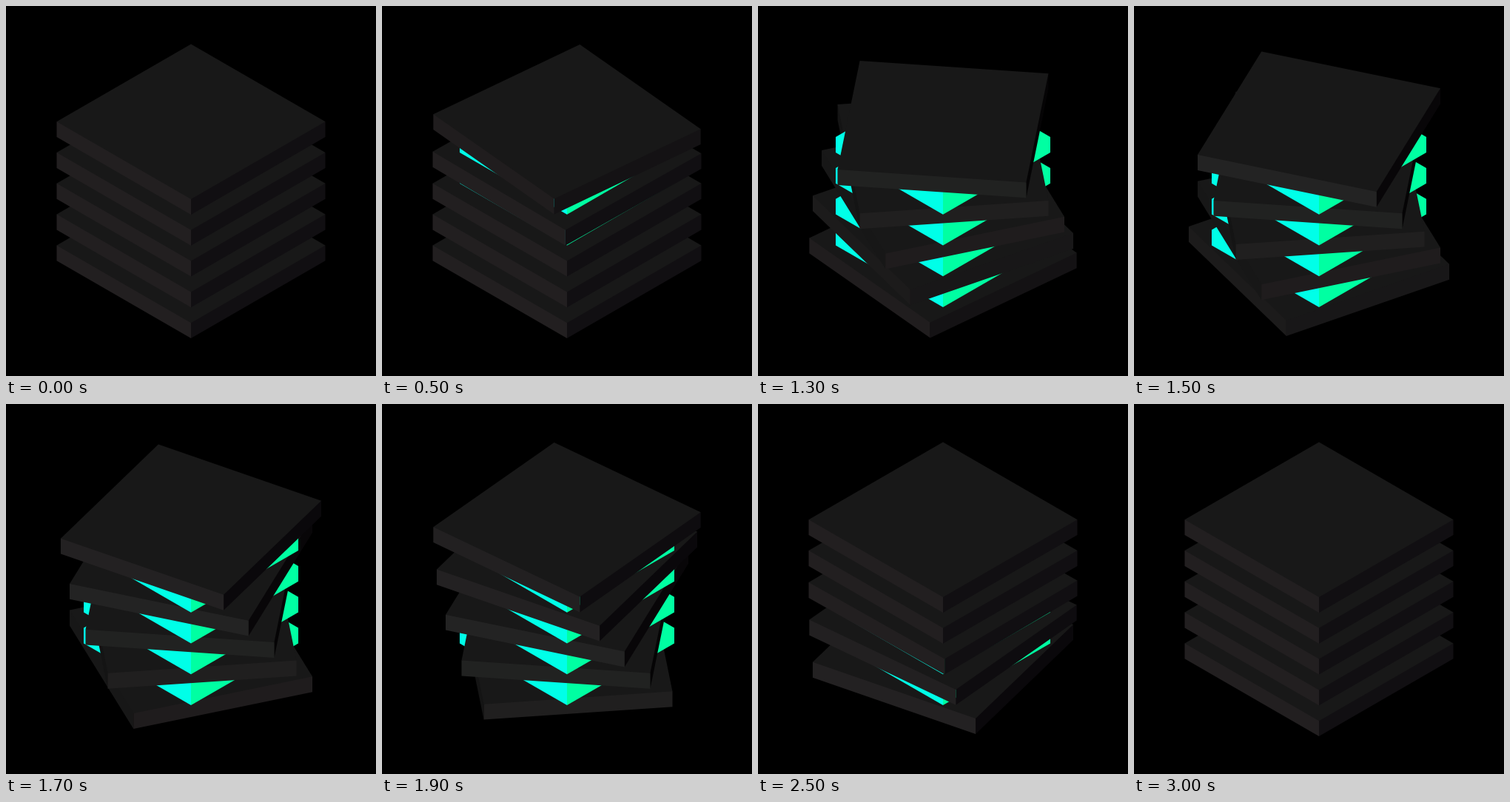
Animation of 500x500 px, one loop 3.1 s. Source, as an HTML page with a canvas:

```html
<!DOCTYPE html>
<html lang="en">
<head>
<meta charset="utf-8">
<title>Twisting stack</title>
<style>
  html, body { margin: 0; height: 100%; overflow: hidden; background: #000; }
  canvas { display: block; width: 500px; height: 500px; }
</style>
</head>
<body>
<canvas id="stage" width="500" height="500"></canvas>
<script>
const ctx = document.getElementById('stage').getContext('2d');

const LOOP = 3100, STEP = 100;
const START = 200, TURN = 2000, STAGGER = 200;
const SLABS = 5, CX = 250, TOP = 156.2, THICK = 20.9;
const RADIUS = 181.5, CORE = 145, TILT = 1 / Math.sqrt(3);
const CYAN = '#00ffe8', GREEN = '#00ffa2', LID = '#181818';

// Side shade by direction: [degrees, r, g, b]; 0 faces the viewer
const SHADES = [
  [-90, 18, 18, 18], [-70, 23, 23, 23], [-45, 34, 31, 32], [-20, 35, 35, 35],
  [0, 32, 33, 32], [20, 31, 28, 29], [31, 24, 23, 24], [45, 17, 15, 18],
  [60, 10, 8, 11], [90, 3, 3, 3]
];

function shade(dir) {
  const i = Math.max(1, SHADES.findIndex(s => s[0] >= dir));
  const a = SHADES[i - 1], b = SHADES[i];
  const k = (dir - a[0]) / (b[0] - a[0]);
  const mix = n => Math.round(a[n] + (b[n] - a[n]) * k);
  return `rgb(${mix(1)},${mix(2)},${mix(3)})`;
}

function fill(points, color) {
  ctx.fillStyle = color;
  ctx.beginPath();
  points.forEach(([x, y]) => ctx.lineTo(x, y));
  ctx.fill();
}

function corner(deg, radius, y) {
  const a = deg * Math.PI / 180;
  return [CX + radius * Math.sin(a), y + radius * TILT * Math.cos(a)];
}

const lower = ([x, y]) => [x, y + THICK];

function drawSlab(y, angle) {
  for (const base of [135, -45, 45]) {
    const dir = base - angle;
    if (Math.abs(dir) >= 90) continue;
    const a = corner(dir - 45, RADIUS, y), b = corner(dir + 45, RADIUS, y);
    fill([a, [CX, y], b, lower(b), lower(a)], shade(dir));
  }
  fill([0, 90, 180, 270].map(d => corner(d - angle, RADIUS, y)), LID);
}

function drawCore(y) {
  const rise = CORE * TILT;
  for (const [side, color] of [[-1, CYAN], [1, GREEN]]) {
    const x = CX + side * CORE;
    fill([[CX, y - rise], [x, y], [x, y + THICK], [CX, y + THICK + rise]], color);
  }
}

function angleAt(t, i) {
  const k = Math.min(1, Math.max(0, (t - START - i * STAGGER) / TURN));
  return 90 * k * k * (3 - 2 * k);
}

function draw(t) {
  ctx.fillStyle = '#000';
  ctx.fillRect(0, 0, 500, 500);
  for (let i = SLABS - 1; i >= 0; i--) {
    const y = TOP + i * THICK * 2;
    const angle = angleAt(t, i);
    const turning = angle > 0 && angle < 90;
    if (turning && i < SLABS - 1) drawCore(y + THICK);
    drawSlab(y, angle);
  }
}

const origin = performance.now();
function tick() {
  const t = (performance.now() - origin) % LOOP;
  draw(Math.floor(t / STEP) * STEP);
  requestAnimationFrame(tick);
}
tick();
</script>
</body>
</html>
```
